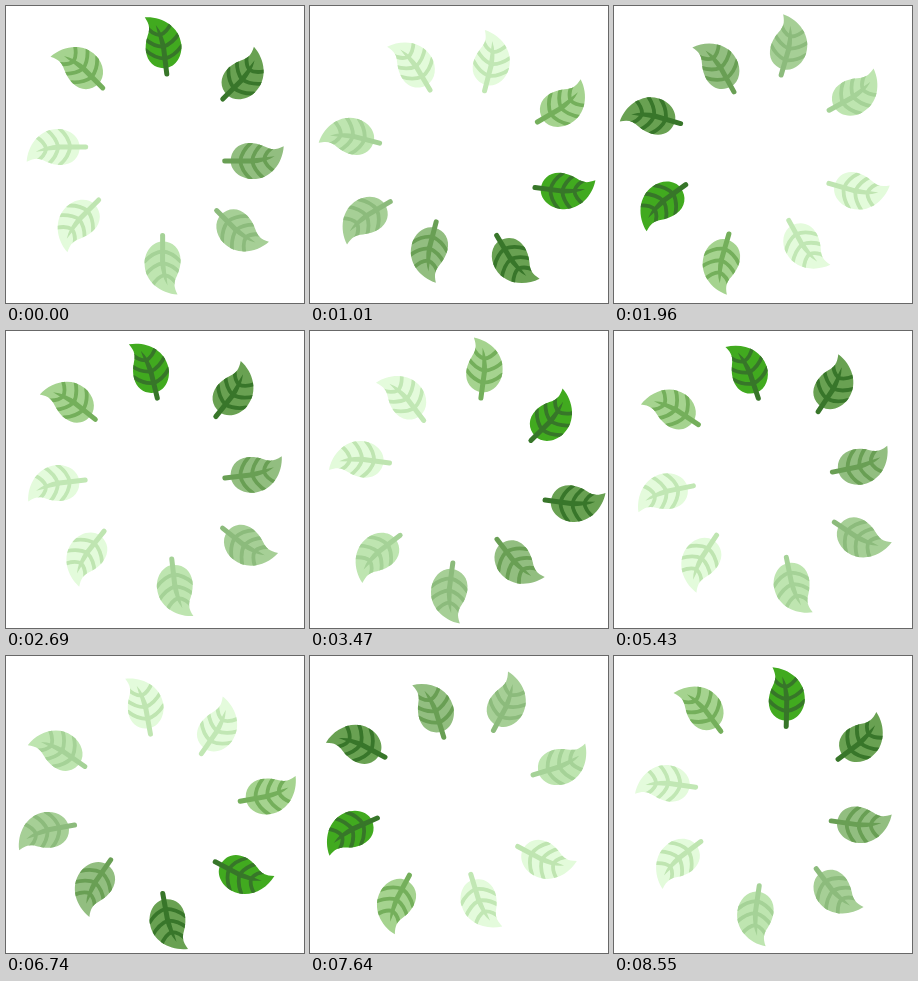
Animation, 298 px wide and 297 px high, one loop 8.6 s. Source, as an HTML page with a canvas:

```html
<!DOCTYPE html>
<html lang="en">
<head>
<meta charset="utf-8">
<title>Leaf spinner</title>
<style>
  html, body { margin: 0; width: 100%; height: 100%; overflow: hidden; background: #fff; }
  canvas { display: block; width: 298px; height: 297px; }
</style>
</head>
<body>
<canvas id="stage"></canvas>
<script>
const W = 298, H = 297, LOOP = 8600, LAST = 8550, TURN = 2802;
const RAD = Math.PI / 180;
const canvas = document.getElementById('stage');
const ctx = canvas.getContext('2d');
const dpr = window.devicePixelRatio || 1;
canvas.width = W * dpr;
canvas.height = H * dpr;

// Stem end relative to the ring centre, tilt in degrees, blade and vein colours
const leaves = [
  { x: 11.8, y: -81.6, tilt: -7, blade: '#41aa1f', vein: '#377629' },
  { x: 67.8, y: -56.6, tilt: 45, blade: '#69a152', vein: '#38762a' },
  { x: 69.8, y: 5.4, tilt: 90, blade: '#92be80', vein: '#699f54' },
  { x: 61.8, y: 54.9, tilt: 135, blade: '#a6cf96', vein: '#8cbb7c' },
  { x: 7.8, y: 79.9, tilt: 180, blade: '#bee5b0', vein: '#a5d297' },
  { x: -56.2, y: 44.4, tilt: 225, blade: '#e3fbdb', vein: '#bfe5b1' },
  { x: -69.2, y: -8.6, tilt: 270, blade: '#e4fbdc', vein: '#c1e7b4' },
  { x: -52.2, y: -67.6, tilt: 315, blade: '#a5d38f', vein: '#74af5b' }
];

// One turn: time in ms, angle in degrees
const keys = [[0, 0], [144, 8.2], [668, 52.5], [1136, 124.6], [1578, 189.2],
              [1960, 241], [2628, 348.5], [TURN, 360]];

const blade = new Path2D('M0-6C10-6 18-16 18-28C18-46 2-58-15-59' +
  'C-11-51-11-47-14.5-40C-17-34-18-30-18-25C-18-13-10-6 0-6Z');
const ribs = new Path2D('M-18-26Q-10-17 0-15.5Q10-17 18-26' +
  'M-18-38Q-10-29-.5-27.5Q9-29 18-40M-15-50Q-10-41-2-39.5Q5-41 11-51');
const stem = new Path2D('M0 0L0-28');
const tipRib = new Path2D('M-2.5-26L2.5-26Q1.5-40-5-50Q-3.5-38-2.5-26Z');

// Key i, continued into the neighbouring turns
function key(i) {
  const n = keys.length - 1;
  const lap = Math.floor(i / n);
  const [t, a] = keys[i - lap * n];
  return [t + lap * TURN, a + lap * 360];
}

function slope(i) {
  const [t0, a0] = key(i - 1), [t1, a1] = key(i), [t2, a2] = key(i + 1);
  const before = (a1 - a0) / (t1 - t0), after = (a2 - a1) / (t2 - t1);
  return 2 * before * after / (before + after);
}

function angleAt(t) {
  const u = t % TURN;
  let i = 0;
  while (u >= keys[i + 1][0]) i++;
  const [t0, a0] = key(i), [t1, a1] = key(i + 1);
  const d = t1 - t0, s = (u - t0) / d, r = 1 - s;
  return a0 * r * r * (1 + 2 * s) + a1 * s * s * (3 - 2 * s) +
    d * s * r * (slope(i) * r - slope(i + 1) * s);
}

function drawLeaf(leaf) {
  ctx.save();
  ctx.translate(leaf.x, leaf.y);
  ctx.rotate(leaf.tilt * RAD);
  ctx.fillStyle = leaf.blade;
  ctx.fill(blade);
  ctx.strokeStyle = ctx.fillStyle = leaf.vein;
  ctx.lineCap = 'round';
  ctx.lineWidth = 5;
  ctx.stroke(stem);
  ctx.clip(blade);
  ctx.fill(tipRib);
  ctx.lineWidth = 3.8;
  ctx.stroke(ribs);
  ctx.restore();
}

function draw(t) {
  ctx.setTransform(dpr, 0, 0, dpr, 0, 0);
  ctx.fillStyle = '#fff';
  ctx.fillRect(0, 0, W, H);
  ctx.translate(148.9, 149.6);
  ctx.rotate(angleAt(Math.min(t, LAST)) * RAD);
  leaves.forEach(drawLeaf);
}

const start = performance.now();
function tick() {
  draw((performance.now() - start) % LOOP);
  requestAnimationFrame(tick);
}
tick();
</script>
</body>
</html>
```
